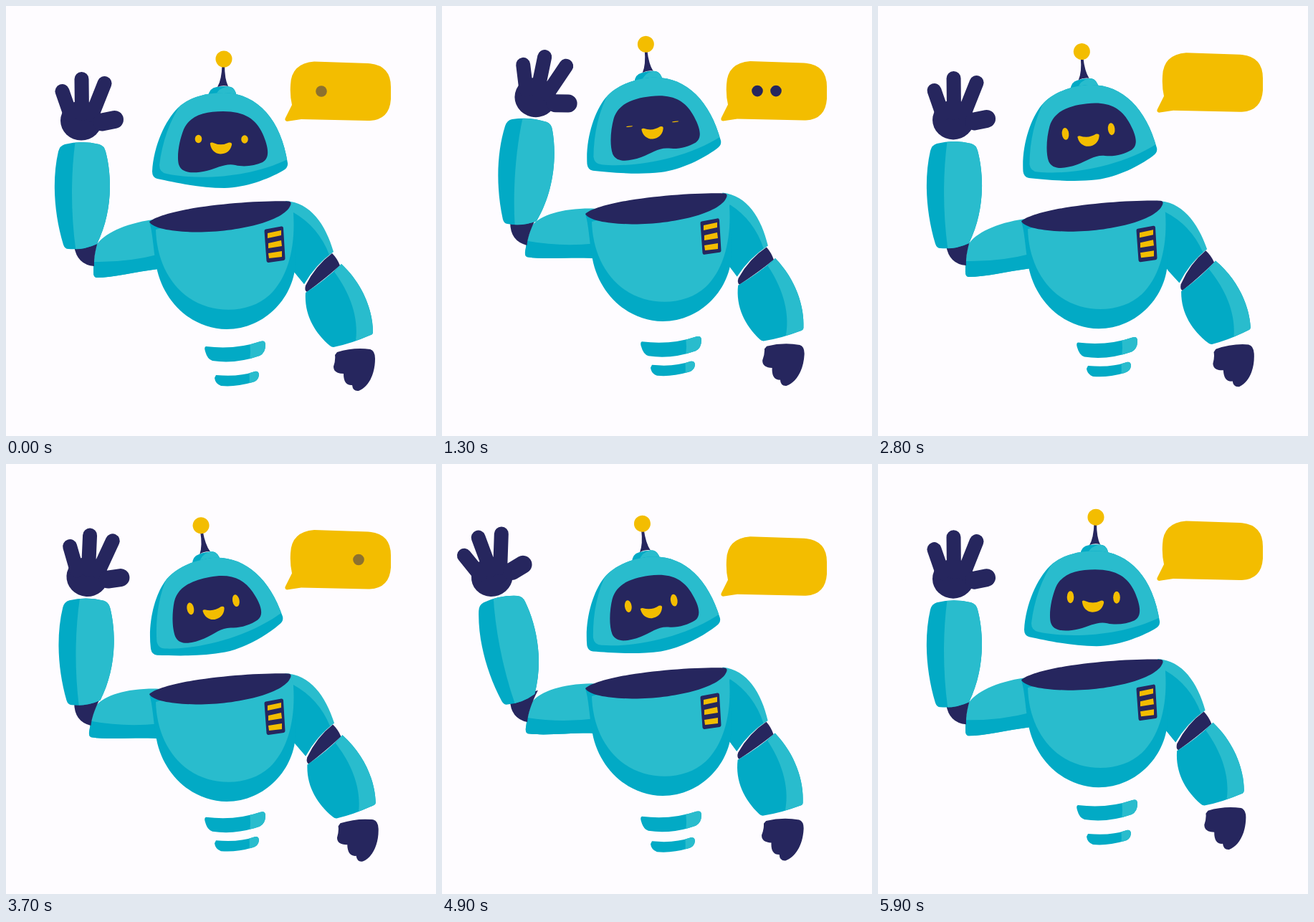
An HTML page for the animation above (6 s loop, 600 by 600 pixels).

```html
<!DOCTYPE html>
<html lang="en">
<head>
<meta charset="utf-8">
<title>Waving robot</title>
<style>
  html, body { margin: 0; width: 100%; height: 100%; overflow: hidden; background: #fefcff; }
  svg { display: block; width: 100vw; height: 100vh; }
  .light { fill: #29bccd; }
  .dark { fill: #02aac5; }
  .navy { fill: #26265e; }
  .gold { fill: #f3bd00; }
  .finger { fill: none; stroke: #26265e; stroke-linecap: round; stroke-width: 20px; }
  .thumb { stroke-width: 25px; }
</style>
</head>
<body>
<svg viewBox="0 0 600 600">
  <defs>
    <path id="dome" d="M204 231C206 195 222 160 240 142C256 127 280 121 304 121C352 122 384 160 393 219Q394 226 386 230C365 242 335 253 305 254C270 254 235 246 211 241Q204 239 204 231Z"/>
    <path id="fore" d="M73 203Q75 195 82 193Q106 187 130 193Q137 195 139 203C148 237 149 287 127 332Q108 341 87 339Q82 339 80 333C67 290 64 242 73 203Z"/>
    <path id="rib1" d="M279 475Q320 480 355 468Q362 466 362 473Q362 484 354 488Q320 500 288 495Q281 493 278 482Q276 476 279 475Z"/>
    <path id="rib2" d="M293 515Q325 518 347 510Q353 509 353 515Q352 523 344 525Q320 532 300 530Q292 527 291 519Z"/>
    <clipPath id="inDome"><use href="#dome"/></clipPath>
    <clipPath id="inFore"><use href="#fore"/></clipPath>
    <clipPath id="inRib1"><use href="#rib1"/></clipPath>
    <clipPath id="inRib2"><use href="#rib2"/></clipPath>
  </defs>

  <g id="waist1">
    <use href="#rib1" class="dark"/>
    <path class="light" clip-path="url(#inRib1)" d="M338 460H370V500H338Q344 485 338 460Z"/>
  </g>
  <g id="waist2">
    <use href="#rib2" class="dark"/>
    <path class="light" clip-path="url(#inRib2)" d="M338 500H370V540H337Q342 525 338 500Z"/>
  </g>

  <g id="body">
    <g id="upperArm">
      <path class="light" d="M126 334C136 318 164 304 205 298L218 297L225 366L212 367C180 371 150 379 126 379Q122 378 122 372Q122 350 126 334Z"/>
      <path class="dark" d="M122 357Q170 358 215 346L225 366L212 367C180 371 150 379 126 379Q122 378 122 372Z"/>
      <path class="navy" d="M95 335Q99 361 123 363Q122 345 132 317Z"/>
    </g>
    <g id="foreArm">
      <use href="#fore" class="dark"/>
      <path class="light" clip-path="url(#inFore)" d="M98 180C90 230 90 290 98 345H160V180Z"/>
      <g id="hand">
        <ellipse class="navy" cx="105" cy="160" rx="29" ry="27.5"/>
        <path class="finger" d="M78.500 119L90 152M105.500 102L106 150M137.500 108L120 152"/>
        <path class="finger thumb" d="M151.500 158.500L134 162"/>
      </g>
    </g>
    <g id="sideArm">
      <path class="light" d="M390 272C425 274 446 305 457 343Q432 361 416 388L402 371L388 350Z"/>
      <path class="dark" d="M401 288Q436 308 451 347Q430 363 416 388L402 371L388 350Z"/>
      <path class="navy" d="M455 345Q462 352 466 362Q446 380 420 399Q416 397 418 390Q432 362 455 345Z"/>
      <path class="dark" d="M468 360C498 388 512 425 512 455Q512 458 509 459Q482 471 457 476Q454 476 452 474C430 455 416 430 418 400Q446 382 468 360Z"/>
      <path class="light" d="M468 360C498 388 512 425 512 455Q512 458 509 459L488 467C493 430 476 395 458 371Z"/>
      <path class="navy" d="M462 483Q485 476 508 479Q515 481 515 492C515 515 505 532 492 537Q484 538 483 529Q471 530 471 513Q457 513 457 503Q460 494 459 487Z"/>
    </g>
    <path class="dark" d="M200 301C205 318 205 335 209 358C216 410 258 451 308 451C362 451 404 405 404 355C404 320 401 295 398 276Z"/>
    <path class="light" d="M209 312C210 350 225 386 255 407C290 431 340 429 368 403C394 378 404 335 401 290L398 276L300 285Z"/>
    <path class="navy" d="M200 301C225 281 340 271 394 272.500Q399 273 397 278C388 301 320 316 265 315.500C235 315 205 311 200 301Z"/>
    <path class="navy" stroke="#26265e" stroke-width="5" stroke-linejoin="round" d="M363 314L384.500 310L387 352.500L366 355.500Z"/>
    <path class="gold" d="M365 317L384 313V320L365 324ZM366 331L384 327L385 335L366 338ZM366 345L385 342V350L367 352Z"/>
  </g>

  <g id="head">
    <path class="dark" d="M282 126Q284 114 294 113Q304 111 314 113Q320 115 322 126Z"/>
    <path class="light" d="M292 126Q296 114 310 112Q320 114 322 126Z"/>
    <path class="navy" d="M295 113Q301 103 301.500 82H305Q305 102 310 112Q302 110 295 113Z"/>
    <circle class="gold" cx="304" cy="74" r="11.500"/>
    <use href="#dome" class="dark"/>
    <path class="light" clip-path="url(#inDome)" d="M246 134C228 160 218 190 214 222Q214 232 224 234C265 243 338 241 395 213L400 100H260Z"/>
    <path class="navy" d="M303 147C333 147 349 158 358 178C366 196 369 212 358 218C347 223 332 225 320 222C306 219 296 226 280 230C262 234 245 234 241 221C238 208 242 187 248 172C257 152 278 147 303 147Z"/>
    <ellipse class="gold eye" cx="268.500" cy="185.500" rx="4.800"/>
    <ellipse class="gold eye" cx="333" cy="186" rx="4.800"/>
    <path class="gold" d="M285 193Q284 190 288 190.500Q300 196 311 190.500Q316 190 315 194C313 203 306 206.500 299 206.500C291 206 286 200 285 193Z"/>
  </g>

  <g id="bubble">
    <path class="gold" d="M430 77.500L505 80Q537 82 537 113V130Q535 160 505 160L412 158L392 161Q388 160 390 156L399 138Q396 125 397 110Q398 80 430 77.500Z"/>
    <circle class="navy dot" cx="440" cy="119" r="7.800"/>
    <circle class="navy dot" cx="466" cy="119" r="7.800"/>
    <circle class="navy dot" cx="492" cy="119" r="7.800"/>
  </g>
</svg>
<script>
const LOOP = 6000, STEP = 100, WAVE = 825;

const clamp = x => Math.max(0, Math.min(1, x));
const rad = deg => deg * Math.PI / 180;

// Eased 0 to 1 between times a and b.
function ramp(t, a, b) {
  const u = clamp((t - a) / (b - a));
  return u * u * (3 - 2 * u);
}
// Rises over a..b, holds, falls over c..d.
const pulse = (t, a, b, c, d) => ramp(t, a, b) - ramp(t, c, d);

const pose = (id, x, y, turn = 0, px = 0, py = 0) =>
  document.getElementById(id).setAttribute('transform', `translate(${x} ${y}) rotate(${turn} ${px} ${py})`);
const eyes = document.querySelectorAll('.eye');
const dots = document.querySelectorAll('.dot');

const openness = t => clamp(Math.max(.08, Math.min(Math.abs(t - 100), Math.abs(t - 1300)) / 150));

// Dots run across twice in each half of the loop.
function dotAlpha(i, t) {
  const half = t % (LOOP / 2), u = (half < 1000 ? half : half - 1050) - 150 * i;
  return clamp((u + 50) / 100) * clamp((450 - u) / 100);
}

function draw(t) {
  // Floating: the loose parts trail the body by a share of the sway.
  const bob = -15 * ramp(t, 0, 1950) + 36.5 * ramp(t, 1950, 3950) - 21.5 * ramp(t, 3950, LOOP);
  const sway = Math.sin(3 * Math.PI * t / LOOP);
  const tilt = pulse(t, 0, 700, 4500, 5700);
  pose('body', 0, bob);
  pose('bubble', 0, bob + 12 * sway);
  pose('waist1', 0, bob + 5 * sway);
  pose('waist2', 0, bob + 5 * sway - 7.5 * tilt);
  pose('sideArm', 0, 0, 3.1 * sway, 400, 300);
  pose('head', 0, bob - 10 * pulse(t, 0, 700, 4300, 5300),
    -tilt * (6.4 + 4.4 * ramp(t, 2800, 3900)), 298, 250);

  // Two bouts of waving; the hand bends a little ahead of the arm.
  const lift = pulse(t, 600, 1000, 2050, 2850) + pulse(t, 3200, 3650, 4650, 5600);
  const vigor = pulse(t, 650, 1150, 2500, 2800) + pulse(t, 3550, 4000, 4900, 5600);
  const phase = 2 * Math.PI * (t - 1300) / WAVE;
  pose('upperArm', 0, 0, 9 * lift, 235, 325);
  pose('foreArm', 4.5 * lift, -22.5 * lift, vigor * (9.5 * Math.cos(phase) - 5), 104, 337);
  pose('hand', vigor * 7 * Math.cos(phase), 0, vigor * 9 * Math.cos(phase + rad(30)), 105, 160);

  eyes.forEach(eye => eye.setAttribute('ry', 8.5 * openness(t)));
  dots.forEach((dot, i) => dot.setAttribute('opacity', dotAlpha(i, t)));
}

const start = performance.now();
function tick() {
  const t = Math.max(0, performance.now() - start) % LOOP;
  draw(Math.floor(t / STEP) * STEP);
  requestAnimationFrame(tick);
}
tick();
</script>
</body>
</html>
```
